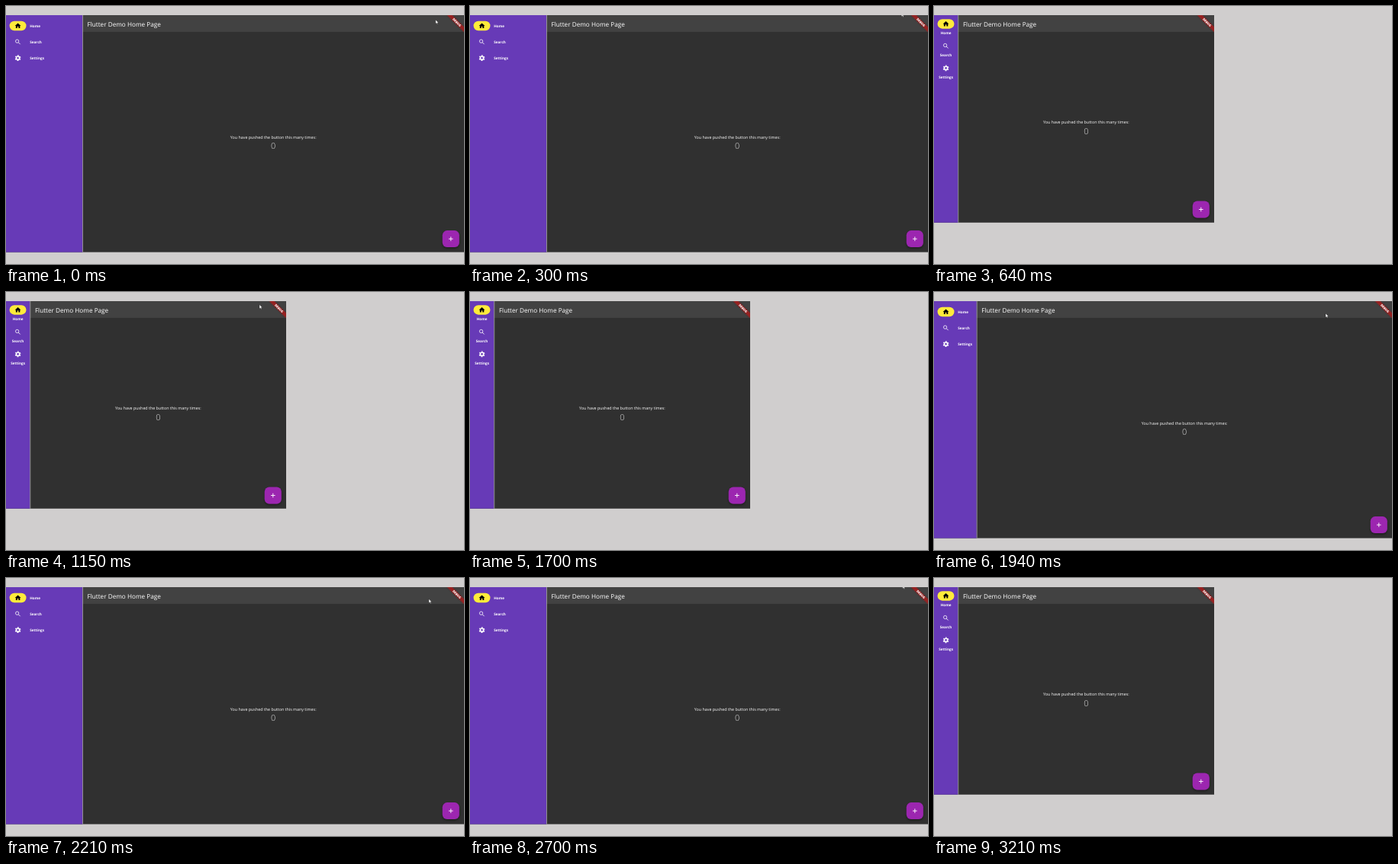
Recreate the animation shown at these times as an HTML page. Size 600 by 338 pixels, loop 4.56 s.

```html
<!DOCTYPE html>
<html lang="en">
<head>
<meta charset="utf-8">
<title>Adaptive navigation rail</title>
<style>
  html, body { margin: 0; width: 100%; height: 100%; overflow: hidden; background: #d0cece; }
  svg { display: block; width: 100vw; height: 100vh; }
  text { font-family: "Open Sans", "Noto Sans", sans-serif; fill: #fff; text-rendering: geometricPrecision; }
  .mid { text-anchor: middle; }
  .label { font-size: 4.7px; font-weight: 700; }
</style>
</head>
<body>
<svg viewBox="0 0 600 338">
  <defs>
    <clipPath id="windowClip"><rect id="windowBox" y="12"/></clipPath>
    <clipPath id="railClip"><rect id="railBox" y="12" height="326"/></clipPath>
    <filter id="soft" x="-40%" y="-40%" width="180%" height="190%">
      <feDropShadow dx="0" dy="1.4" stdDeviation="1.5" flood-color="#000" flood-opacity=".45"/>
    </filter>
    <filter id="ribbonShadow" x="-20%" y="-60%" width="140%" height="220%">
      <feDropShadow dx="0" dy="0" stdDeviation="2.5" flood-color="#000" flood-opacity=".5"/>
    </filter>
  </defs>

  <rect width="600" height="338" fill="#d0cece"/>

  <g clip-path="url(#windowClip)">
    <rect y="12" width="600" height="326" fill="#303030"/>
    <rect y="12" width="600" height="21.9" fill="#424242"/>
    <text id="title" y="26.5" font-size="8.2">Flutter Demo Home Page</text>

    <g id="counter">
      <text class="mid" y="-4.6" font-size="5.35">You have pushed the button this many times:</text>
      <text class="mid" y="8.8" font-size="10.9" fill-opacity=".8" style="font-weight:300">0</text>
    </g>

    <g id="fab">
      <rect x="-11" y="-11" width="22" height="22" rx="6.2" fill="#9c27b0" filter="url(#soft)"/>
      <path d="M-2.8 0H2.8M0 -2.8V2.8" stroke="#fff" stroke-width=".9"/>
    </g>

    <g clip-path="url(#railClip)">
      <rect y="12" width="101" height="326" fill="#673ab7"/>
      <g class="item">
        <rect x="4.6" y="-6.25" width="21.9" height="12.5" rx="6.25" fill="#ffeb3b"/>
        <path transform="translate(15.6) scale(.39) translate(-12 -12)"
              d="M10 20v-6h4v6h5v-8h3L12 3 2 12h3v8z"/>
        <text class="label">Home</text>
      </g>
      <g class="item">
        <g transform="translate(15.6) scale(.39) translate(-12 -12)" fill="none" stroke="#fff" stroke-width="2">
          <circle cx="9.5" cy="9.5" r="5.5"/>
          <path d="M13.6 13.6L19.8 19.8" stroke-width="2.2"/>
        </g>
        <text class="label">Search</text>
      </g>
      <g class="item">
        <g transform="translate(15.6) scale(.39) rotate(15)" fill="none" stroke="#fff">
          <circle r="5.5" stroke-width="4"/>
          <circle r="8.6" stroke-width="2.8" pathLength="12" stroke-dasharray="1 1"/>
        </g>
        <text class="label">Settings</text>
      </g>
    </g>
    <rect id="divider" y="12" width=".8" height="326" fill="#aaa8ac"/>

    <g id="ribbon">
      <g transform="scale(.3906) rotate(45)">
        <rect x="-40" y="28" width="80" height="12" fill="#b71c1c" fill-opacity=".7" filter="url(#ribbonShadow)"/>
        <text class="mid" y="37.6" font-size="10.2" font-weight="800">DEBUG</text>
      </g>
    </g>

    <path id="cursor" d="M0 0V5.3L1.25 4.2 2.1 6 3 5.6 2.2 3.9H3.8Z"
          fill="#fff" stroke="#111" stroke-width=".35"/>
  </g>
</svg>

<script>
  const LOOP = 4560;
  const $ = id => document.getElementById(id);
  const items = [...document.querySelectorAll('.item')];

  const WIDE = { w: 600, h: 310.4, compact: false };
  const SMALL = { w: 367, h: 271.8, compact: true };

  // [start ms, window, rail extension 0..1, cursor x, cursor y]
  const steps = [
    [0, WIDE, 1, 562.8, 18],
    [300, WIDE, 1, 565.2, 8.6],
    [640, SMALL, 0],
    [1120, SMALL, 0, 22, 24],
    [1150, SMALL, 0, 332, 16.6],
    [1360, SMALL, 0, 344, 13],
    [1700, SMALL, 0],
    [1820, WIDE, 0, 444.9, 27.8],
    [1850, WIDE, .02, 460, 28],
    [1880, WIDE, .08, 477, 28],
    [1910, WIDE, .19, 495, 28],
    [1940, WIDE, .355, 513, 28],
    [2210, WIDE, 1, 553.9, 27.4],
    [2700, WIDE, 1, 566.6, 8.6],
    [3210, SMALL, 0]
  ];

  const set = (el, attrs) => {
    for (const name in attrs) el.setAttribute(name, attrs[name]);
  };
  const move = (el, x, y) => set(el, { transform: `translate(${x} ${y})` });

  function draw([, win, ext, cx, cy]) {
    const { w, h, compact } = win;
    const rail = 31.4 + 68.6 * ext;
    const bottom = 12 + h;

    set($('windowBox'), { width: w, height: h });
    set($('railBox'), { width: rail });
    set($('divider'), { x: rail });
    set($('title'), { x: rail + 6.5 });
    move($('counter'), (rail + .4 + w) / 2, (33.9 + bottom) / 2);
    move($('fab'), w - 17.2, bottom - 17.3);
    move($('ribbon'), w, 12);

    items.forEach((item, i) => {
      move(item, 0, compact ? 23.4 + 29 * i : 26 + 21.1 * i);
      set(item.lastElementChild, {
        x: compact ? 15.6 : 31.2,
        y: compact ? 13.2 : 1.8,
        'text-anchor': compact ? 'middle' : 'start',
        opacity: compact ? 1 : Math.min(1, ext * 4)
      });
    });

    set($('cursor'), { visibility: cx === undefined ? 'hidden' : 'visible' });
    if (cx !== undefined) move($('cursor'), cx, cy);
  }

  let shown;
  const start = performance.now();

  function tick() {
    const t = (performance.now() - start) % LOOP;
    const step = steps.findLast(s => s[0] <= t);
    if (step !== shown) draw(shown = step);
    requestAnimationFrame(tick);
  }
  tick();
</script>
</body>
</html>
```
